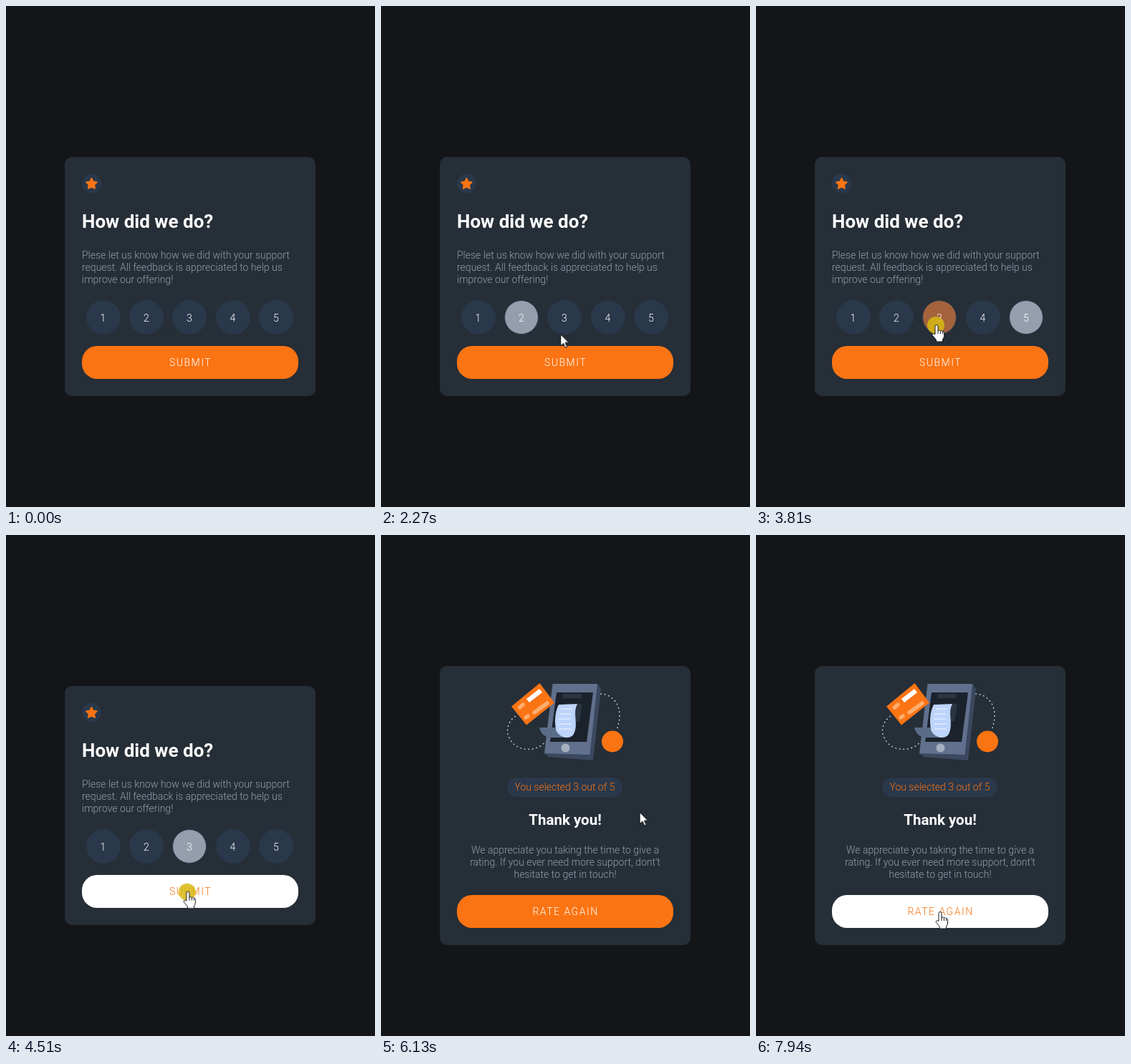
Write an HTML page that moves like this. It is 515x700 px and loops after 8000 ms.

```html
<!DOCTYPE html>
<html lang="en">
<head>
<meta charset="utf-8">
<title>Rating card</title>
<style>
:root { --bg: #131518; --card: #262e37; --disc: #2a384b; --orange: #fb7413; --grey: #959eac; }
html, body { margin: 0; width: 100%; height: 100%; overflow: hidden; background: var(--bg); }
svg { display: block; width: 515px; height: 700px; font: 300 14px Roboto, "Open Sans", sans-serif; }
.card { fill: var(--card); }
.disc, .pill { fill: var(--disc); }
.disc { stroke: var(--disc); }
.orange { fill: var(--orange); }
.mid { text-anchor: middle; }
.white { fill: #fff; }
.body { fill: var(--grey); }
.bold { fill: #fff; font-weight: 700; }
.label { fill: #fff; text-anchor: middle; letter-spacing: 1.5px; }

/* every track shares one 8 s loop */
.a { animation: 8s linear infinite both; }
.step { animation-timing-function: step-end; }
.form { animation-name: form; }
.thanks { animation-name: thanks; }
.d1 { animation-name: d1; }
.d2 { animation-name: d2; }
.d3 { animation-name: d3; }
.d5 { animation-name: d5; }
.submit { animation-name: submit; }
.submit-text { animation-name: submit-text; }
.again { animation-name: again; }
.again-text { animation-name: again-text; }
.cursor { animation-name: move; }
.shown { animation-name: shown; }
.arrow { animation-name: arrow; }
.hand { animation-name: hand; }
.click { animation-name: click; }

@keyframes form { 0% { visibility: visible } 57.5%, 100% { visibility: hidden } }
@keyframes thanks { 0% { visibility: hidden } 57.5%, 100% { visibility: visible } }

@keyframes d1 {
  0%, 15% { fill: var(--disc) } 15.25% { fill: #313848 }
  18% { fill: #d96b1a } 18.5% { fill: #d96b1a } 21.5%, 100% { fill: var(--disc) }
}
@keyframes d2 {
  0%, 12% { fill: var(--disc) } 14.6% { fill: #d86d1f } 15.25% { fill: #b26129 }
  18%, 19.5% { fill: var(--disc) } 21.5% { fill: var(--orange) }
  24%, 33% { fill: var(--grey) } 34.5%, 100% { fill: var(--disc) }
}
@keyframes d3 {
  0%, 38.2% { fill: var(--disc) } 41.5%, 42.5% { fill: var(--orange) }
  45.3% { fill: var(--disc) } 47.6% { fill: #a4623c }
  50.5%, 57.5% { fill: var(--grey) } 58%, 100% { fill: var(--disc) }
}
@keyframes d5 {
  0%, 31.8% { fill: var(--disc) } 33% { fill: #8b5a32 }
  34.5%, 47.8% { fill: var(--grey) } 50.5%, 100% { fill: var(--disc) }
}
@keyframes submit {
  0%, 29.25% { fill: var(--orange) } 31.1% { fill: #fedcc4 } 34.25%, 49.6% { fill: var(--orange) }
  53%, 57.5% { fill: #fff } 58%, 100% { fill: var(--orange) }
}
@keyframes submit-text {
  0%, 29.25% { fill: #fff } 31.1% { fill: #fc9043 } 34.25%, 49.6% { fill: #fff }
  53%, 57.5% { fill: var(--orange) } 58%, 100% { fill: #fff }
}
@keyframes again { 0%, 96% { fill: var(--orange) } 98.9%, 100% { fill: #fff } }
@keyframes again-text { 0%, 96% { fill: #fff } 98.9%, 100% { fill: var(--orange) } }

@keyframes move {
  0%, 4% { transform: translate(88px, 674px) }
  5.25% { transform: translate(85px, 520px) }
  6.75% { transform: translate(112px, 360px) }
  8.25% { transform: translate(200px, 308px) }
  10% { transform: translate(290px, 350px) }
  11.25% { transform: translate(250px, 400px) }
  12.5% { transform: translate(205px, 430px) }
  13.625% { transform: translate(190px, 438px) }
  15.25% { transform: translate(153px, 439px) }
  16.875% { transform: translate(140px, 440px) }
  18.5% { transform: translate(156px, 441px) }
  20.75% { transform: translate(195px, 442px) }
  24.125% { transform: translate(198px, 448px) }
  26.625% { transform: translate(236px, 460px) }
  28.375% { transform: translate(250px, 458px) }
  29.625% { transform: translate(272px, 490px) }
  30.75% { transform: translate(330px, 485px) }
  31.875% { transform: translate(366px, 455px) }
  33.125% { transform: translate(364px, 446px) }
  34.5% { transform: translate(363px, 448px) }
  36.25% { transform: translate(345px, 462px) }
  37.5% { transform: translate(300px, 462px) }
  38.75% { transform: translate(258px, 455px) }
  40.625% { transform: translate(254px, 454px) }
  43.125% { transform: translate(252px, 463px) }
  45.5% { transform: translate(252px, 455px) }
  47.25%, 48.5% { transform: translate(252px, 446px) }
  50.25% { transform: translate(253px, 515px) }
  52.5% { transform: translate(253px, 501px) }
  57.5% { transform: translate(254px, 498px) }
  60.75% { transform: translate(256px, 498px) }
  61.625% { transform: translate(258px, 490px) }
  63.75% { transform: translate(250px, 430px) }
  66% { transform: translate(231px, 376px) }
  68.125% { transform: translate(194px, 339px) }
  71.25% { transform: translate(186px, 345px) }
  74.375% { transform: translate(300px, 378px) }
  76.875% { transform: translate(367px, 388px) }
  79.375% { transform: translate(290px, 330px) }
  81.875% { transform: translate(169px, 299px) }
  83.75% { transform: translate(278px, 345px) }
  85.25% { transform: translate(369px, 398px) }
  88.75% { transform: translate(345px, 425px) }
  92.25% { transform: translate(278px, 424px) }
  95% { transform: translate(265px, 490px) }
  97.5% { transform: translate(257px, 522px) }
  99.25%, 100% { transform: translate(257px, 527px) }
}
@keyframes shown { 0% { opacity: 0 } 4%, 100% { opacity: 1 } }
@keyframes hand {
  0% { opacity: 0 } 12% { opacity: 1 } 26% { opacity: 0 } 29.25% { opacity: 1 } 36% { opacity: 0 }
  38.25% { opacity: 1 } 42.5% { opacity: 0 } 45.25% { opacity: 1 } 57.5% { opacity: 0 } 96%, 100% { opacity: 1 }
}
@keyframes arrow {
  0% { opacity: 1 } 12% { opacity: 0 } 26% { opacity: 1 } 29.25% { opacity: 0 } 36% { opacity: 1 }
  38.25% { opacity: 0 } 42.5% { opacity: 1 } 45.25% { opacity: 0 } 57.5% { opacity: 1 } 96%, 100% { opacity: 0 }
}
@keyframes click {
  0% { opacity: 0 } 20.75% { opacity: .85 } 22.25% { opacity: 0 } 33% { opacity: .85 } 34.5% { opacity: 0 }
  47.25% { opacity: .85 } 48.75% { opacity: 0 } 56% { opacity: .85 } 57.5%, 100% { opacity: 0 }
}
</style>
</head>
<body>
<svg viewBox="0 0 515 700">
  <g class="a step form">
    <rect class="card" x="82" y="211" width="350" height="334" rx="10"/>
    <circle class="pill" cx="119.5" cy="248" r="13.5"/>
    <path class="orange" stroke="#fb7413" stroke-width="2" stroke-linejoin="round"
      d="M119.4 241l2.2 4.6 5 .7-3.6 3.5.9 5-4.5-2.4-4.5 2.4.9-5-3.6-3.5 5-.7z"/>
    <text class="bold" x="106" y="310" font-size="26">How did we do?</text>
    <g class="body">
      <text x="106" y="353">Plese let us know how we did with your support</text>
      <text x="106" y="370">request. All feedback is appreciated to help us</text>
      <text x="106" y="387">improve our offering!</text>
    </g>
    <circle class="disc a d1" cx="136" cy="435" r="23.5"/>
    <circle class="disc a d2" cx="196" cy="435" r="23.5"/>
    <circle class="disc a d3" cx="256" cy="435" r="23.5"/>
    <circle class="disc" cx="317" cy="435" r="23.5"/>
    <circle class="disc a d5" cx="377" cy="435" r="23.5"/>
    <g class="mid white">
      <text x="135.5" y="440.5">1</text>
      <text x="196" y="440.5">2</text>
      <text x="256" y="440.5">3</text>
      <text x="316.5" y="440.5">4</text>
      <text x="377" y="440.5">5</text>
    </g>
    <rect class="a submit" x="106" y="475" width="302" height="46" rx="21"/>
    <text class="label a submit-text" x="257.5" y="503">SUBMIT</text>
  </g>

  <g class="a step thanks">
    <rect class="card" x="82" y="183" width="350" height="390" rx="10"/>
    <g fill="none" stroke="#d5dbe5" stroke-width="1.3" stroke-dasharray="2 3.6">
      <path d="M188 253C177 260 173 274 180 285C187 299 205 303 221 296L230 289"/>
      <path d="M306 222C321 222 333 234 333 252C333 260 331 266 329 273"/>
    </g>
    <path fill="#3b485f" d="M302 208l5 7-11 100-62-5-6-5z"/>
    <path fill="#61708d" d="M239.500 208H302L291.500 307 228 305z"/>
    <path fill="#1b222b" d="M245 220H296L287 289H236z"/>
    <path fill="#2b3441" d="M254 222h26v6h-27zM272 236h9l-4 25h-6z"/>
    <path fill="#bdd4fb" d="M248 237L274 236C267 249 276 264 269 278C267 282 263 283 258 283H240C246 278 243 268 243 260C243 250 245 243 248 237z"/>
    <path fill="none" stroke="#f2f7ff" stroke-width="1.2" d="M251 243h16M249 250h16M248 257h17M248 264h18M249 271h17"/>
    <path fill="#596c88" d="M221 269H243C245 277 250 282 259 283H236C228 282 223 277 221 269z"/>
    <circle cx="257.500" cy="297.500" r="6" fill="#a5afbf"/>
    <path class="orange" d="M221.500 207L242 234.500 203 265.500 182 239.500z"/>
    <path fill="#fff" d="M203 229L221 215 225 220 207 234z"/>
    <g fill="none" stroke="#ffac6d" stroke-width="5.500" stroke-linecap="round">
      <path d="M193.500 241l4.500-4M202 255l3-2M214 248l18-13"/>
    </g>
    <circle class="orange" cx="323" cy="288.500" r="15"/>

    <rect class="pill" x="176" y="339" width="161" height="27" rx="13.5"/>
    <text class="orange mid" x="256.5" y="356.5">You selected 3 out of 5</text>
    <text class="bold mid" x="257" y="404.5" font-size="20.5">Thank you!</text>
    <g class="body mid">
      <text x="257" y="444.5">We appreciate you taking the time to give a</text>
      <text x="257" y="461.5">rating. If you ever need more support, dont't</text>
      <text x="257" y="478.5">hesitate to get in touch!</text>
    </g>
    <rect class="a again" x="106" y="503" width="302" height="46" rx="21"/>
    <text class="label a again-text" x="257.5" y="531">RATE AGAIN</text>
  </g>

  <g class="a cursor"><g class="a step shown">
    <circle class="a step click" cx="-1" r="12" fill="#d8b914"/>
    <path class="a step arrow" fill="#fff" stroke="#15181c" stroke-width="1"
      d="M.5 .5V16.500L4.300 13 6.900 19 9.400 18 6.800 12H11.700z"/>
    <g class="a step hand" fill="#fff" stroke="#15181c" stroke-width="1" stroke-linejoin="round">
      <path d="M-2 12.500V1.500a2 2 0 0 1 4 0V8a1.800 1.800 0 0 1 3.400.4a1.800 1.800 0 0 1 3.200.7a1.500 1.500 0 0 1 2 1.400V16l-2 4v3H-.500v-2.500L-5.400 14.500c-1.400-2 .7-3.600 2.100-2.300z"/>
      <path fill="none" d="M2 8v4M5.400 8.500V12M8.600 9.500V12"/>
    </g>
  </g></g>
</svg>
</body>
</html>
```
